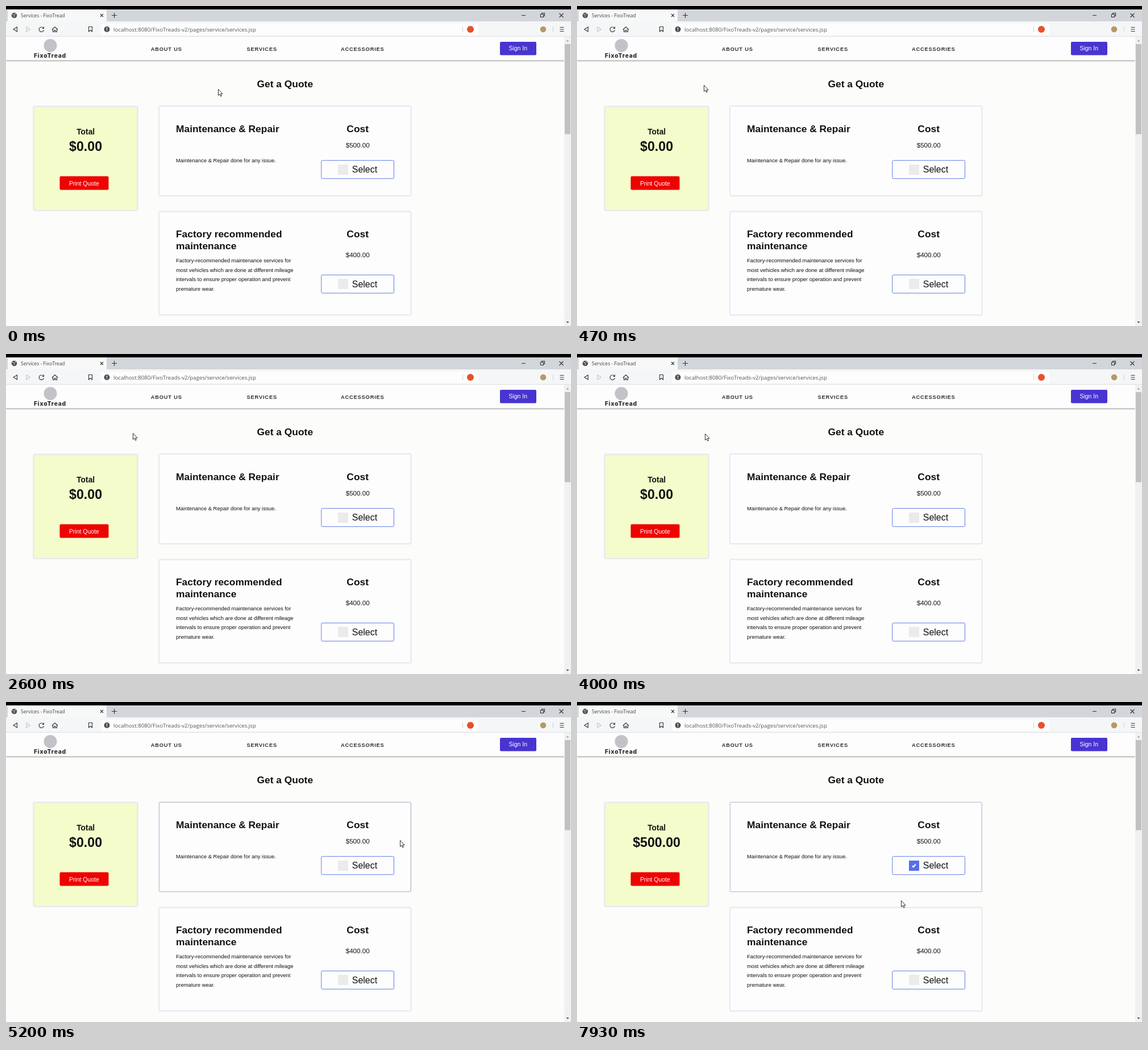
Animation of 994 by 563 pixels, one loop 8000 ms. Source, as an HTML page:

```html
<!DOCTYPE html>
<html lang="en">
<head>
<meta charset="utf-8">
<title>Services</title>
<style>
html, body { margin: 0; width: 100%; height: 100%; overflow: hidden; background: #fcfcfb; }
svg { display: block; width: 994px; height: 563px; }
text { font-family: "Liberation Sans", Arial, sans-serif; fill: #111; }
.ui text { font-family: "Open Sans", "Noto Sans", sans-serif; }
.nav { font-size: 9.36px; font-weight: 700; letter-spacing: .78px; fill: #333; }
.h { font-size: 17.4px; font-weight: 700; }
.p { font-size: 9.45px; }
.price { font-size: 11.65px; }
.sel { font-size: 15.95px; }
.mid { text-anchor: middle; }
.btn { font-size: 10.45px; fill: #fff; text-anchor: middle; }
.card { fill: #fdfdfd; stroke: #e2e2f0; filter: drop-shadow(0 0 1px #d4d4e4); }
.box { fill: #fdfdfd; stroke: #5f7ce6; }
.line { fill: none; stroke: #333; stroke-width: 1.1; }
</style>
</head>
<body>
<svg viewBox="0 0 994 563">
  <rect width="994" height="563" fill="#fcfcfb"/>

  <!-- page header -->
  <rect y="54" width="982" height="41.5" fill="#fdfdfd" style="filter:drop-shadow(0 1px 1.3px #888)"/>
  <circle cx="78" cy="69.5" r="11.5" fill="#c3c2c8"/>
  <text x="49" y="91" style="font:800 10.4px Inter,sans-serif;letter-spacing:.75px;fill:#2b2b2b">FixoTread</text>
  <g class="nav">
    <text class="nav" x="254.7" y="78.5">ABOUT US</text>
    <text class="nav" x="423.6" y="78.5">SERVICES</text>
    <text class="nav" x="589" y="78.5">ACCESSORIES</text>
  </g>
  <rect x="869" y="63" width="64" height="23.5" rx="2" fill="#4834d0"/>
  <text class="btn" x="900.7" y="78">Sign In</text>

  <!-- browser window -->
  <g class="ui">
    <rect width="994" height="6"/>
    <rect y="6" width="994" height="21" fill="#d2d5d9"/>
    <rect x="3" y="6" width="174" height="22" fill="#f7f8f8"/>
    <rect y="27" width="994" height="27" fill="#f5f6f7"/>
    <rect x="167" y="31" width="664" height="20" rx="2" fill="#fdfdfd"/>
    <path d="M0 53.5H994" stroke="#dedfe1"/>
    <circle cx="14.5" cy="16.5" r="4.8" fill="#4b4f54"/>
    <path d="M11 14.5l3 1 1.5 2-2 2M15 13l3 1.5" stroke="#eee" fill="none"/>
    <text x="26" y="19.8" font-size="8.5" style="fill:#444">Services - FixoTread</text>
    <path class="line" d="M166 14l5 5m0-5l-5 5M186 16.5h9M190.5 12v9M907 16.5h7"/>
    <path class="line" d="M940.5 14.5h5v5h-5zM942.5 14.5v-2h5v5h-2M973.5 13l7 7m0-7l-7 7"/>
    <path class="line" d="M19.5 37v8l-6.5-4z"/>
    <path class="line" d="M36 37v8l6.500-4z" style="stroke:#c3c5c8"/>
    <path class="line" d="M65.8 38.6a4.300 4.300 0 1 0 .8 3.600M66.500 36.500v3h-3" stroke-width="1.300"/>
    <path class="line" d="M81 41.500l5-4.700 5 4.700M82.500 41v4.500h2.500v-3h2v3h2.500V41M145.500 36.500h6v8.500l-3-2.500-3 2.500z"/>
    <circle cx="177.500" cy="41" r="5" fill="#4d5156"/>
    <path d="M177.500 38v3.500m0 1.200v1.300" stroke="#fff" stroke-width="1.300"/>
    <text x="189" y="44.500" font-size="9.700" style="fill:#55585c">localhost:8080/FixoTreads-v2/pages/service/services.jsp</text>
    <path d="M803.500 36v10M962.500 36v10" stroke="#d0d2d5"/>
    <circle cx="817" cy="41" r="6" fill="#e8502c"/>
    <circle cx="945" cy="41" r="5.300" fill="#b59a62"/>
    <path class="line" d="M974.500 37.500h7m-7 3.500h7m-7 3.500h7"/>
  </g>

  <!-- scrollbar -->
  <rect x="982" y="54" width="12" height="509" fill="#f1f1f1"/>
  <rect x="983" y="67" width="10" height="158.500" fill="#c1c1c1"/>
  <path d="M985.500 62.500l2.500-3 2.500 3z" fill="#a3a3a3"/>
  <path d="M985.500 555l2.500 3 2.500-3z" fill="#505050"/>

  <text class="h mid" x="490.800" y="143.300">Get a Quote</text>

  <!-- total -->
  <rect class="card" x="49" y="177" width="182" height="182.500" rx="1" style="fill:#f4fccb"/>
  <text class="mid" x="140.200" y="226.300" font-size="13.800" font-weight="700">Total</text>
  <text id="total" class="mid" x="140.100" y="254.800" font-size="23.200" font-weight="700">$0.00</text>
  <rect x="94.500" y="299.500" width="86" height="24" rx="2" fill="#ee0303"/>
  <text class="btn" x="137.400" y="315.800">Print Quote</text>

  <!-- services -->
  <rect class="card" x="269.500" y="176.500" width="442.500" height="157" rx="1"/>
  <rect id="hover" x="269.500" y="176.500" width="442.500" height="157" rx="1" fill="none" stroke="#b9b9cb" opacity="0"/>
  <text class="h" x="299" y="221.800">Maintenance &amp; Repair</text>
  <text class="p" x="299" y="274.700">Maintenance &amp; Repair done for any issue.</text>
  <text class="h mid" x="618.700" y="221.800">Cost</text>
  <text class="price mid" x="618.700" y="248.700">$500.00</text>
  <rect class="box" x="554.800" y="271.700" width="127.700" height="32" rx="2"/>
  <rect id="check" x="584" y="279" width="18" height="18" fill="#ebebeb"/>
  <path id="tick" d="M589.800 288.200l2 2 4-4.700" fill="none" stroke="#fff" stroke-width="2" opacity="0"/>
  <text class="sel" x="608.800" y="293.200">Select</text>

  <rect class="card" x="269.500" y="362" width="442.500" height="181" rx="1"/>
  <text class="h" x="299" y="407.300">Factory recommended</text>
  <text class="h" x="299" y="427.800">maintenance</text>
  <text class="p" x="299" y="450.900">Factory-recommended maintenance services for</text>
  <text class="p" x="299" y="467.700">most vehicles which are done at different mileage</text>
  <text class="p" x="299" y="484.400">intervals to ensure proper operation and prevent</text>
  <text class="p" x="299" y="501.100">premature wear.</text>
  <text class="h mid" x="618.700" y="407.300">Cost</text>
  <text class="price mid" x="618.700" y="442.200">$400.00</text>
  <rect class="box" x="554.800" y="473.200" width="127.700" height="32" rx="2"/>
  <rect x="584" y="480" width="18" height="18" fill="#ebebeb"/>
  <text class="sel" x="608.800" y="494.700">Select</text>

  <!-- pointer -->
  <g id="pointer" fill="#fff" stroke="#1c1c1c" stroke-width=".9" stroke-linejoin="round">
    <path id="arrow" d="M.500 .500V11.400L3 9.200L4.700 13L6.400 12.200L4.700 8.600H8.100Z"/>
    <path id="hand" d="M-1.200 1.500c0-1.600 2.200-1.600 2.200 0v4.800c.1-1.200 1.900-1 2 .3 .1-1 1.800-.8 1.900.5 .2-.9 1.900-.7 1.900.8v3.600c0 2.200-1 3.200-1.500 4.200H.2C-.8 14-3.200 11.500-4.600 9.200c-.9-1.500.9-2.200 2-.8l1.400 1.500z"/>
  </g>
</svg>
<script>
const LOOP = 8000, FPS = 15;
const $ = id => document.getElementById(id);
const clamp = v => Math.max(0, Math.min(1, v));
const easeOut = u => 1 - (1 - u) ** 2;
const easeInOut = u => u * u * (3 - 2 * u);
const linear = u => u;

// start, end, target x, target y, easing
const moves = [
  [0, 467, 223, 139, easeOut],
  [3530, 4000, 225, 140, linear],
  [4400, 5130, 693, 243, easeInOut],
  [5200, 5730, 598, 285, easeInOut],
  [5867, 6000, 596, 283, linear],
  [7400, 7930, 570, 349, easeInOut]
];

function pointerAt(t) {
  let x = 373, y = 146;
  for (const [from, to, tx, ty, ease] of moves) {
    const k = ease(clamp((t - from) / (to - from)));
    x += (tx - x) * k;
    y += (ty - y) * k;
  }
  return [x, y];
}

function draw(t) {
  t = Math.floor((t + 4) * FPS / 1000) * 1000 / FPS;
  const [x, y] = pointerAt(t);
  const onButton = x > 554 && x < 683 && y > 271 && y < 304;
  const checked = t > 6260;
  $("pointer").setAttribute("transform", `translate(${Math.round(x)} ${Math.round(y)})`);
  $("arrow").style.display = onButton ? "none" : "";
  $("hand").style.display = onButton ? "" : "none";
  $("check").setAttribute("fill", checked ? "#566fe8" : "#ebebeb");
  $("tick").setAttribute("opacity", checked ? 1 : 0);
  $("total").textContent = checked ? "$500.00" : "$0.00";
  $("hover").setAttribute("opacity", clamp((t - 4750) / 250) - .3 * clamp((t - 7800) / 200));
}

const start = performance.now();
function tick() {
  draw((performance.now() - start) % LOOP);
  requestAnimationFrame(tick);
}
tick();
</script>
</body>
</html>
```
